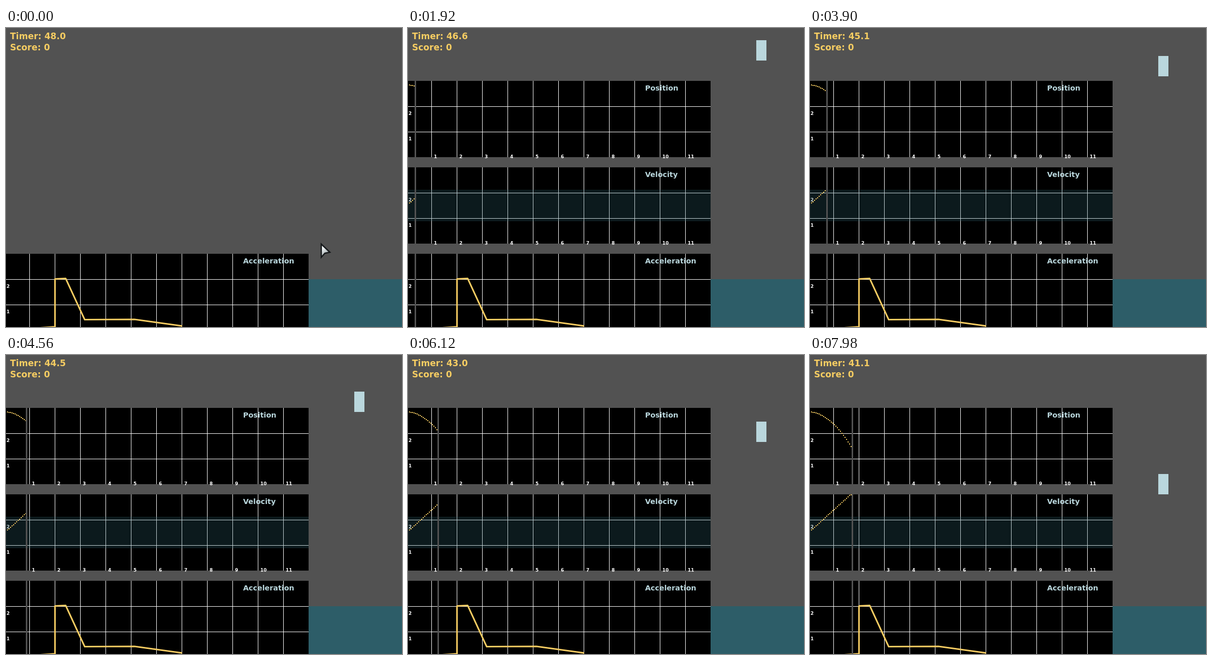
Recreate the animation shown at these times as an HTML page with a canvas. Size 780 by 588 pixels, loop 8000 ms.

```html
<!DOCTYPE html>
<html lang="en">
<head>
<meta charset="utf-8">
<title>Motion graphs</title>
<style>
  html, body { margin: 0; width: 100%; height: 100%; overflow: hidden; background: #525252; }
  canvas { display: block; }
</style>
</head>
<body>
<canvas id="stage" width="780" height="588"></canvas>
<script>
const ctx = document.getElementById('stage').getContext('2d');
const LOOP = 8000, STEP = 60, START = 600;
const GREY = '#525252', GOLD = '#f5cc62', PALE = '#bad7dd', TEAL = '#2d5d68';
const PANEL_W = 596, PANEL_H = 150;

const clockKeys = [
  [600, 0], [1380, .8], [2220, 1.68], [3060, 2.32], [3900, 2.9], [3960, 2.9],
  [4800, 3.68], [5640, 4.48], [6480, 5.36], [7320, 6.16], [7980, 6.86]
];

function clockAt(time) {
  if (time <= START) return 0;
  const i = clockKeys.findIndex(([t]) => t >= time);
  const [t0, c0] = clockKeys[i - 1], [t1, c1] = clockKeys[i];
  return c0 + (c1 - c0) * (time - t0) / (t1 - t0);
}

const fallen = clock => clock + 4.53 * clock ** 2;
const markerX = clock => 12.5 * clock - 4;
const positionY = clock => 111 + .33 * fallen(clock);
const velocityY = clock => Math.max(274, 348 - 11.35 * clock);

function rect(x, y, w, h, color) {
  ctx.fillStyle = color;
  ctx.fillRect(x, y, w, h);
}

function text(string, x, y, size, color) {
  ctx.font = `bold ${size}px "DejaVu Sans", sans-serif`;
  ctx.fillStyle = color;
  ctx.fillText(string, x, y);
}

function drawPanel(title, top) {
  rect(0, top, PANEL_W, PANEL_H, '#000');
  for (let n = 1; n <= 11; n++) {
    rect(50 * n - 4, top, 1, PANEL_H, '#fff');
    text(n, 50 * n + 1, top + 152, 9, '#fff');
  }
  for (let n = 1; n <= 2; n++) {
    const y = top + PANEL_H - 50 * n;
    rect(0, y, PANEL_W, 1, '#fff');
    text(n, 1, y + 17, 9, '#fff');
  }
  text(title, 467, top + 19, 14.3, PALE);
}

function drawAcceleration() {
  ctx.beginPath();
  ctx.moveTo(60, 590);
  for (const [x, y] of [[96.5, 587.5], [96.5, 493.5], [117.5, 492.5],
                        [155, 573.5], [253, 573], [347, 586]]) ctx.lineTo(x, y);
  ctx.strokeStyle = GOLD;
  ctx.lineWidth = 3;
  ctx.lineJoin = 'round';
  ctx.stroke();
}

function drawTrace(curve, clock) {
  for (let x = 2; x < markerX(clock); x += 3)
    rect(x, Math.round(curve((x + 3) / 12.5)), 2, 2, GOLD);
}

function drawPointer(time) {
  const progress = [0, .5, .85, 1][Math.min(3, time / STEP)];
  ctx.save();
  ctx.translate(620 + 35 * progress, 423 + 12 * progress);
  const shade = ctx.createLinearGradient(0, 8, 14, 24);
  shade.addColorStop(.2, '#f2f6f7');
  shade.addColorStop(1, '#8e999d');
  ctx.beginPath();
  ctx.moveTo(1, 2);
  ctx.lineTo(1, 28);
  ctx.lineTo(8, 20);
  ctx.lineTo(18, 18);
  ctx.closePath();
  ctx.fillStyle = shade;
  ctx.fill();
  ctx.strokeStyle = '#16191b';
  ctx.lineWidth = 2.5;
  ctx.lineJoin = 'miter';
  ctx.stroke();
  ctx.restore();
}

function draw(time) {
  const clock = clockAt(time);
  rect(0, 0, 780, 588, GREY);
  rect(PANEL_W, 494, 184, 94, TEAL);
  drawPanel('Acceleration', 444);
  drawAcceleration();

  if (time >= START) {
    drawPanel('Position', 104);
    drawPanel('Velocity', 274);
    rect(0, 318, PANEL_W, 62, 'rgba(45, 93, 104, .28)');
    drawTrace(positionY, clock);
    drawTrace(velocityY, clock);
    rect(Math.round(markerX(clock)), 104, 3, 484, GREY);
    rect(686, Math.round(14 + fallen(clock)), 20, 40, PALE);
  } else {
    drawPointer(time);
  }

  text('Timer: ' + (48 - clock).toFixed(1), 8, 22, 17, GOLD);
  text('Score: 0', 8, 44, 17, GOLD);
}

function frame() {
  draw(Math.floor(performance.now() % LOOP / STEP) * STEP);
  requestAnimationFrame(frame);
}
frame();
</script>
</body>
</html>
```
